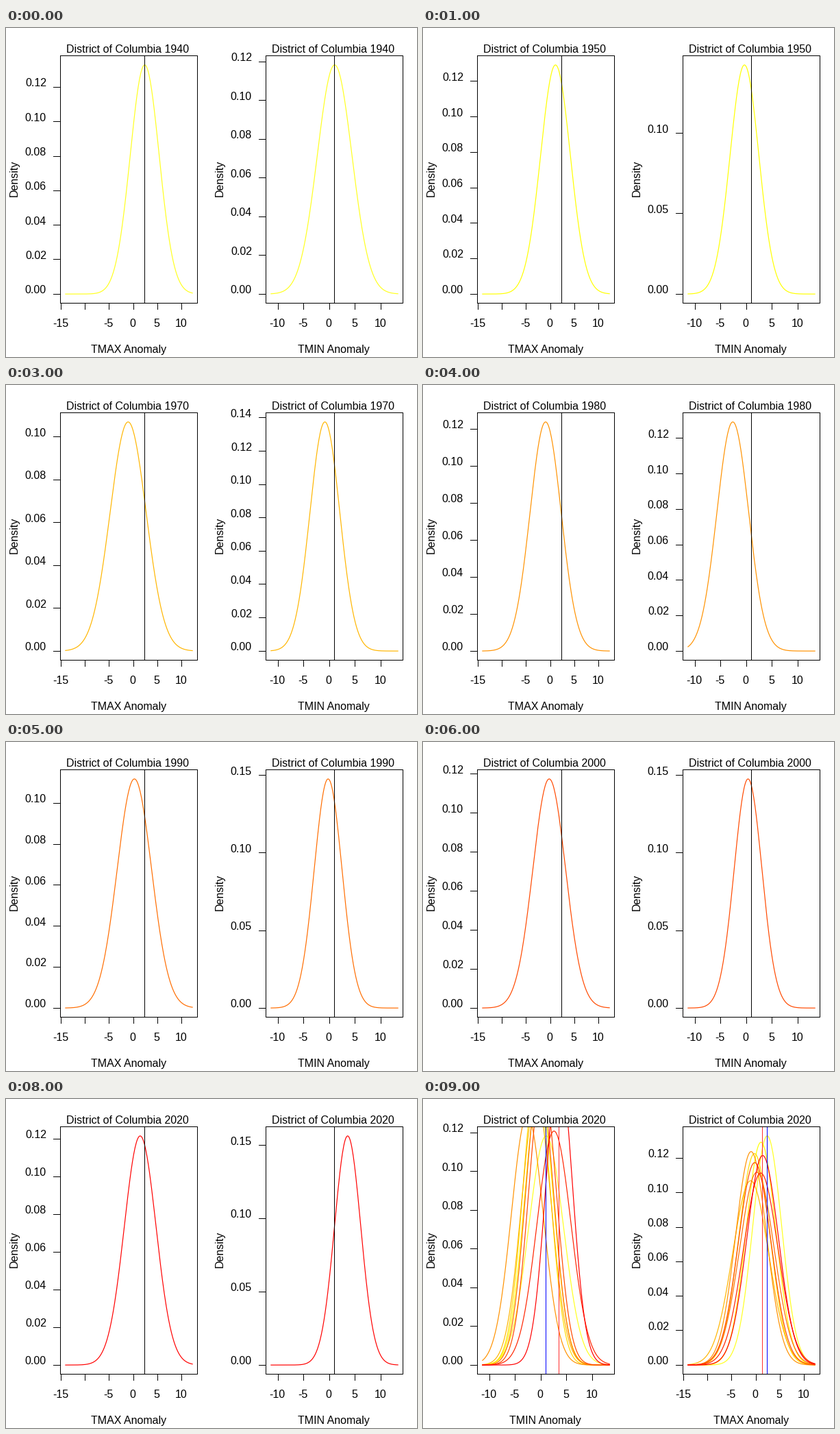
A matplotlib script that plays this animation: 600x480 px, repeating every 10 s.

```python
import math
import numpy as np
import matplotlib.pyplot as plt
from matplotlib.animation import FuncAnimation

W, H, DPI = 600, 480, 100
PX = 72 / DPI
plt.rcParams["font.family"] = "Liberation Sans"
plt.rcParams["font.size"] = 16 * PX

# Panel box in pixels; data fill it up to a 4 % margin on every side
LEFT, TOP, RIGHT, BOTTOM = 79.5, 40.5, 279.5, 401.5
MID = (LEFT + RIGHT) / 2
FILL_W, FILL_H = (RIGHT - LEFT) / 1.08, (BOTTOM - TOP) / 1.08
X0, Y0 = LEFT + 0.04 * FILL_W, BOTTOM - 0.04 * FILL_H
DIGIT, MINUS, GAP = 8.9, 5.3, 13.3

YEARS = range(1940, 2021, 10)
COLORS = ["#ffff20"] + [(1, k / 7, 0) for k in range(7, -1, -1)]


class Variable:
    """A normal density per decade on a shared horizontal scale."""

    def __init__(self, name, low, high, means, sds):
        self.name, self.low, self.high = name, low, high
        self.means, self.sds = means, sds
        self.unit = FILL_W / (high - low)
        self.x = np.linspace(low, high, 200)

    def px(self, v):
        return X0 + (v - self.low) * self.unit

    def peak(self, i):
        return 1 / (self.sds[i] * math.sqrt(2 * math.pi))

    def density(self, i):
        z = (self.x - self.means[i]) / self.sds[i]
        return self.peak(i) * np.exp(-z ** 2 / 2)

    def ticks(self):
        pad = 0.04 * (self.high - self.low)
        first = math.ceil((self.low - pad) / 5)
        last = math.floor((self.high + pad) / 5)
        return [5 * k for k in range(first, last + 1)]


TMAX = Variable("TMAX Anomaly", -14.08, 12.23,
                [2.34, 1.05, -0.3, -1.1, -1.0, 0.2, -0.25, 1.0, 1.4],
                [3.0, 3.085, 3.25, 3.73, 3.22, 3.565, 3.395, 3.58, 3.28])
TMIN = Variable("TMIN Anomaly", -11.38, 13.31,
                [1.0, -0.4, -0.87, -0.9, -2.67, -0.27, 0.3, 2.53, 3.53],
                [3.37, 2.8, 2.67, 2.9, 3.085, 2.7, 2.7, 3.3, 2.55])

fig = plt.figure(figsize=(W / DPI, H / DPI), dpi=DPI, facecolor="white")
ax = fig.add_axes([0, 0, 1, 1])


def crisp(x, y, color="black", **kw):
    """Straight one-pixel line centred on whole pixels."""
    ax.plot(np.floor(x) + 0.5, np.floor(y) + 0.5, color=color, lw=PX,
            snap=False, solid_capstyle="projecting", **kw)


def label(x, y, text, ha="center", **kw):
    ax.text(x, y, text, ha=ha, va="baseline", **kw)


def draw_axes(var, dx, year, top):
    """Box, ticks and labels; top is the density at full curve height."""
    label(dx + MID - 1.7, 36, f"District of Columbia {year}")
    label(dx + MID - 0.7, 474, var.name)
    label(dx + 17, 219.5, "Density", rotation=90, rotation_mode="anchor")
    crisp(dx + np.array([LEFT, RIGHT, RIGHT, LEFT, LEFT]),
          np.array([TOP, TOP, BOTTOM, BOTTOM, TOP]), zorder=5)

    free = 0
    for t in var.ticks():
        x = var.px(t)
        crisp([dx + x, dx + x], [BOTTOM, BOTTOM + 9])
        half = (DIGIT * len(str(abs(t))) + MINUS * (t < 0)) / 2
        if x - half > free:
            label(dx + x - 1, 436, str(t))
            free = x + half + GAP

    step = 0.05 if top > 0.14 else 0.02
    for k in range(10):
        y = Y0 - k * step / top * FILL_H
        if y < TOP:
            break
        crisp([dx + LEFT - 10, dx + LEFT], [y, y])
        label(dx + 59, y - 1, f"{k * step:.2f}", ha="right")


def draw_curve(var, dx, i, top):
    y = Y0 - var.density(i) / top * FILL_H
    y[y < TOP - 20] = TOP - 20
    curve, = ax.plot(dx + var.px(var.x), y, color=COLORS[i], lw=1.2 * PX)
    curve.set_clip_box(
        plt.matplotlib.transforms.Bbox([[0, H - BOTTOM], [W, H - TOP]]))


def draw_mean(var, dx, i, color):
    x = dx + var.px(var.means[i])
    crisp([x, x], [TOP, BOTTOM], color, zorder=4)


def draw(n):
    ax.clear()
    ax.set(xlim=(0, W), ylim=(H, 0))
    ax.axis("off")
    summary = n == len(YEARS)
    panels = (TMIN, TMAX) if summary else (TMAX, TMIN)
    for var, dx in zip(panels, (0, W / 2)):
        top = var.peak(0 if summary else n)
        draw_axes(var, dx, YEARS[-1] if summary else YEARS[n], top)
        for i in range(len(YEARS)) if summary else [n]:
            draw_curve(var, dx, i, top)
        draw_mean(var, dx, 0, "blue" if summary else "black")
        if summary:
            draw_mean(var, dx, -1, "#ff3030")
    return []


anim = FuncAnimation(fig, draw, frames=len(YEARS) + 1, interval=1000,
                     init_func=lambda: draw(0), repeat=True, repeat_delay=0)
plt.show()
```
